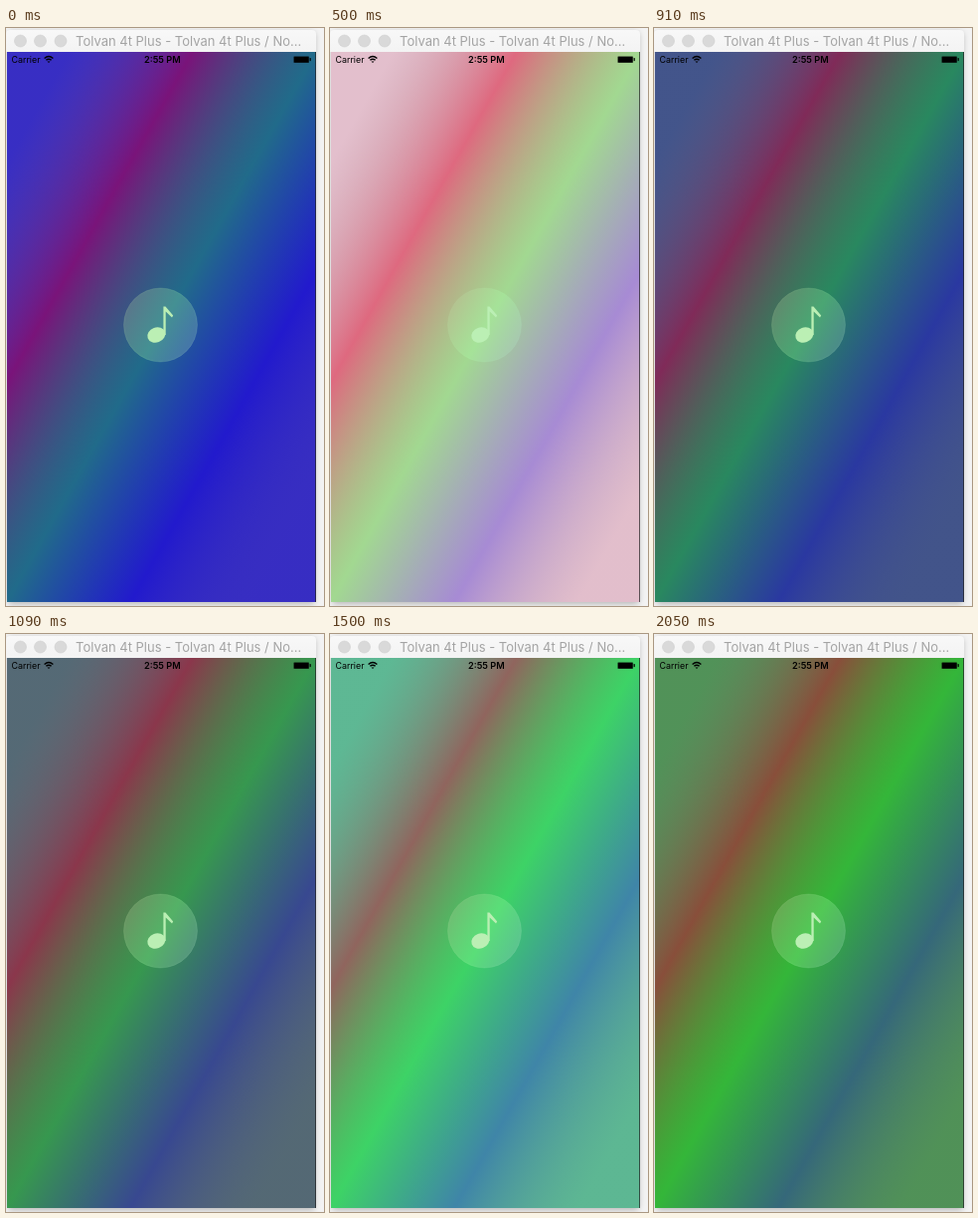
Recreate the animation shown at these times as an HTML page. Size 320 by 580 pixels, loop 2.1 s.

```html
<!DOCTYPE html>
<html lang="en">
<head>
<meta charset="utf-8">
<title>Colour party</title>
<style>
  html, body { margin: 0; width: 100%; height: 100%; overflow: hidden; background: #f3f3f3; }
  svg { display: block; }
  text { font-family: Inter, Roboto, sans-serif; }
</style>
</head>
<body>
<svg width="320" height="580" viewBox="0 0 320 580">
  <defs>
    <linearGradient id="bands" x1="0" y1="0" x2="1" y2="1">
      <stop offset=".1" stop-color="#808080" stop-opacity=".1"/>
      <stop offset=".3" stop-color="#cd001e" stop-opacity=".47"/>
      <stop offset=".5" stop-color="#0f0" stop-opacity=".32"/>
      <stop offset=".7" stop-color="#0000d2" stop-opacity=".3"/>
      <stop offset=".9" stop-color="#777" stop-opacity=".1"/>
    </linearGradient>
    <linearGradient id="bar" x2="0" y2="1">
      <stop stop-color="#f8f8f8"/>
      <stop offset="1" stop-color="#f3f3f3"/>
    </linearGradient>
    <filter id="blur" x="-5%" y="-5%" width="110%" height="110%"><feGaussianBlur stdDeviation="3"/></filter>
  </defs>

  <!-- window -->
  <rect x="2" y="4" width="309" height="574" rx="4" opacity=".25" filter="url(#blur)"/>
  <path d="M0 24V6Q0 2 4 2H308Q312 2 312 6V24Z" fill="url(#bar)"/>
  <g fill="#d9d9d9" stroke="#cfcfcf" stroke-width=".6">
    <circle cx="14.5" cy="13" r="6"/>
    <circle cx="34.5" cy="13" r="6"/>
    <circle cx="55" cy="13" r="6"/>
  </g>
  <text x="70" y="18" font-size="13" fill="#a4a4a4">Tolvan 4t Plus - Tolvan 4t Plus / No...</text>

  <!-- screen -->
  <rect id="screen" x="1" y="24" width="311" height="552"/>
  <circle cx="155.5" cy="298" r="37" fill="#fff" fill-opacity=".25" stroke="#fff" stroke-opacity=".15"/>
  <rect x="1" y="24" width="311" height="552" fill="url(#bands)"/>
  <g fill="#bbefb4">
    <ellipse cx="151.3" cy="308" rx="9.2" ry="7.4" transform="rotate(-20 151.3 308)"/>
    <path d="M158.4 279.5H160.5L168.2 288.6L167 290.6L160.7 284.5V308H158.4Z"/>
  </g>
  <path d="M311.5 24V576" stroke="#222" stroke-opacity=".7"/>

  <!-- status bar -->
  <text x="5.5" y="35" font-size="8.9">Carrier</text>
  <text x="157.3" y="35" font-size="9.2" font-weight="600" text-anchor="middle">2:55 PM</text>
  <g fill="none" stroke="#000" stroke-width="1.4">
    <path d="M38.6 30.4Q43 26.4 47.4 30.4M40.4 32.3Q43 30 45.6 32.3"/>
    <path d="M41.5 33.4H44.5L43 35Z" fill="#000" stroke="none"/>
  </g>
  <rect x="289.3" y="28.3" width="15.8" height="6.8" rx="1.2" fill-opacity=".6"/>
  <rect x="290" y="29" width="14.4" height="5.4" rx=".6"/>
  <rect x="305.6" y="30" width="1.2" height="3.2" rx=".6"/>
</svg>
<script>
  const LOOP = 2100, HOLD = 200;
  const colours = [
    [48, 37, 203], [150, 110, 200], [238, 198, 213], [28, 26, 176],
    [60, 80, 140], [80, 103, 116], [136, 224, 222], [90, 190, 150],
    [32, 244, 112], [60, 190, 105], [76, 148, 84]
  ];
  const screenRect = document.getElementById('screen');
  const start = performance.now();

  function draw() {
    const t = (performance.now() - start) % LOOP;
    screenRect.setAttribute('fill', `rgb(${colours[Math.floor(t / HOLD)]})`);
    requestAnimationFrame(draw);
  }
  draw();
</script>
</body>
</html>
```
